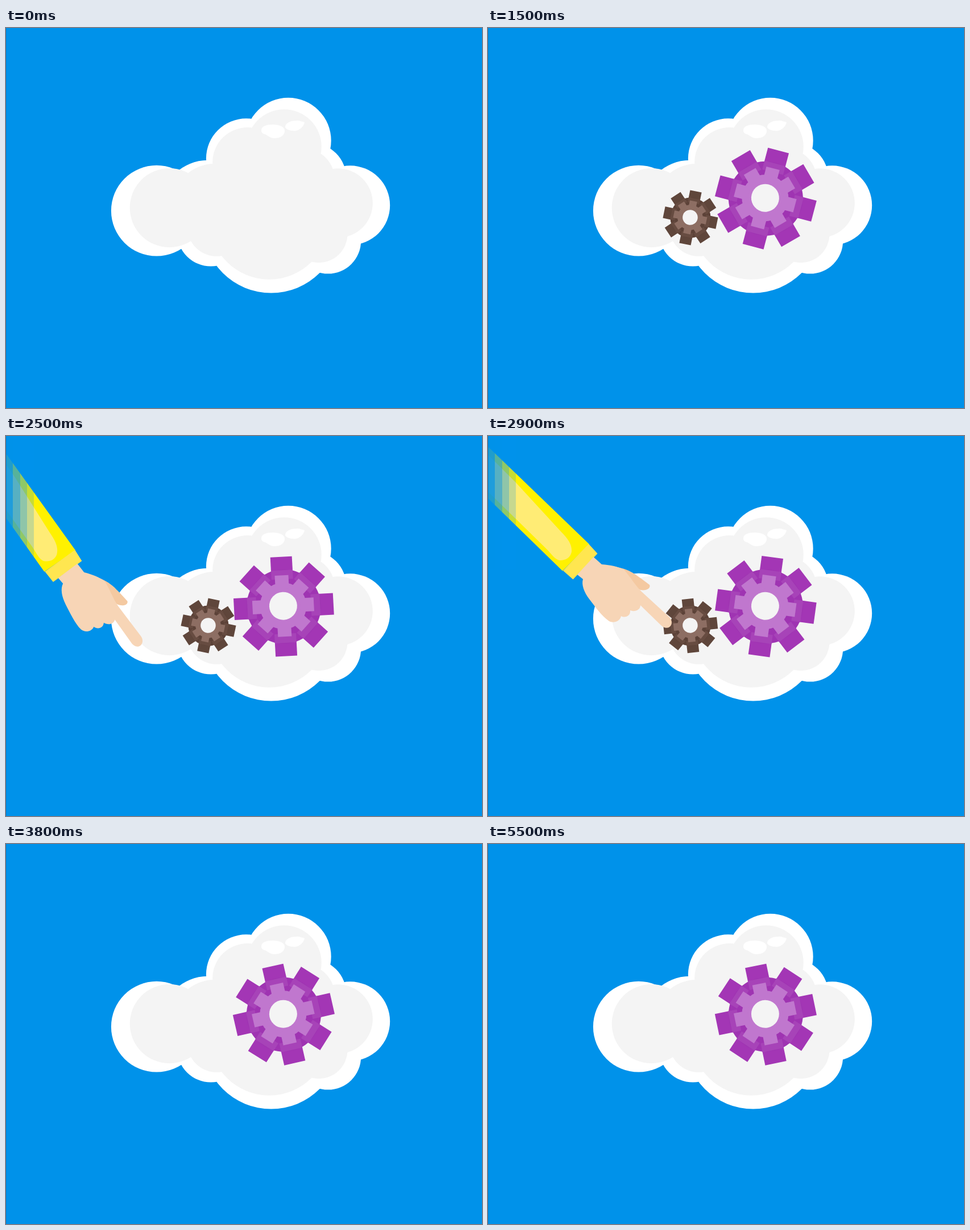
Animation, 837 px wide and 669 px high, one loop 5.6 s. Source, as an HTML page with a canvas:

```html
<!DOCTYPE html>
<html lang="en">
<head>
<meta charset="utf-8">
<title>Cloud gears</title>
<style>
  html, body { margin: 0; width: 100%; height: 100%; overflow: hidden; background: #0092ea; }
  canvas { display: block; width: 837px; height: 669px; }
</style>
</head>
<body>
<canvas id="stage" width="837" height="669"></canvas>
<script>
const ctx = document.getElementById('stage').getContext('2d');
const LOOP = 5600, STEP = 100, GRAB = 2900;
const SKY = '#0092ea', SHADE = '#f4f4f4';
const PIVOT = { x: 91, y: -112 };

const rad = deg => deg * Math.PI / 180;
const progress = (t, from, to) => Math.min(1, Math.max(0, (t - from) / (to - from)));
const easeOut = p => 1 - (1 - p) ** 2;

// Clockwise from the left: centre and radius of each puff.
const puffs = [
  [264.5, 321.5, 79.5], [354, 313, 80], [422, 229.5, 70], [496, 198, 75], [535, 265, 63],
  [605, 312, 69.5], [566, 374.5, 57.5], [466, 346, 120], [360, 360, 59]
];

function cloud(scale, dx, dy) {
  const path = new Path2D();
  for (const [x, y, r] of puffs) {
    const cx = x * scale + dx, cy = y * scale + dy, cr = r * scale + 0.4;
    path.moveTo(cx + cr, cy);
    path.arc(cx, cy, cr, 0, 2 * Math.PI);
  }
  path.rect(354 * scale + dx, 250 * scale + dy, 246 * scale, 130 * scale);
  return path;
}

const outer = cloud(1, 0.3, 0.2);
const inner = cloud(0.871, 57, 36.5);
const shine = new Path2D(
  'M449 180C449 173 458 170 468 170C481 170 491 174 490 182C489 190 482 194 472 194C463 194 460 188 455 187C451 186 449 184 449 180Z' +
  'M491 173C493 166 502 163 512 163C517 163 521 165 525 166C524 173 516 181 507 181C499 181 490 178 491 173Z');

const armParts = [
  ['#fff100', 'M178 190.500L-400 -367L-400 -280L131 237.500Z'],
  ['#ffec75', 'M-400 -366L49 82L128 168C142 182 148 192 147 204C145 214 137 219 126 219C117 217 112 208 103 199L49 146L-400 -293Z'],
  ['#ffe650', 'M177 190L192.500 207L149.500 252.500L132 237Z'],
  ['#f4c9a1', 'M222 230C248 234 258 243 268 250L284 262C287 268 278 273 268 271L246 262Z'],
  ['#f7d5b6', 'M185.500 213L200 226C216 227 228 230 239 235C251 249 259 263 270 274' +
    'L319 319C325 325 324 334 318 337C313 339 308 337 304 333L268 298' +
    'C268 307 257 310 250 307C251 317 241 321 234 317C232 327 220 330 213 326' +
    'C200 317 188 300 178 287C169 275 164 262 167 252L157 244Z']
].map(([color, d]) => [color, new Path2D(d)]);

function paint(color, path) {
  ctx.fillStyle = color;
  ctx.fill(path);
}

function disc(r, color) {
  ctx.fillStyle = color;
  ctx.beginPath();
  ctx.arc(0, 0, r, 0, 2 * Math.PI);
  ctx.fill();
}

function teeth(width, from, to, color) {
  ctx.fillStyle = color;
  for (let i = 0; i < 8; i++) {
    ctx.fillRect(-width / 2, -to, width, to - from);
    ctx.rotate(Math.PI / 4);
  }
}

function turned(x, y, angle, scale, drawPart) {
  ctx.save();
  ctx.translate(x, y);
  ctx.rotate(rad(angle));
  ctx.scale(scale, scale);
  drawPart();
  ctx.restore();
}

function gear(x, y, angle, scale, color) {
  turned(x, y, angle, scale, () => {
    teeth(38, 50, 87.5, color.tooth);
    disc(65.5, color.body);
    teeth(38, 48, 64, color.overlap);
  });
  // The hub sits slightly up and left of the rim.
  turned(x - scale, y - scale, angle, scale, () => {
    disc(41, color.core);
    teeth(24, 30, 54, color.core);
    disc(24.5, SHADE);
  });
}

function purpleGear(t) {
  const y = 300.2 - 327 * (1 - easeOut(progress(t, 300, 1500)));
  gear(488.4, y, 51.4 + 0.02715 * (t - 2850), 1,
    { tooth: '#a336b5', body: '#9f34b2', overlap: '#a743b8', core: '#c077ce' });
}

function brownGear(t) {
  const y = 334 - 150 * (1 - easeOut(progress(t, 200, 1176)));
  gear(356, y, -6.5 - 0.0448 * (t - 900), 0.542,
    { tooth: '#5f463b', body: '#5c4238', overlap: '#674c41', core: '#8d6e63' });
}

// The arm swings in, then swings back out with the small gear.
function arm(t) {
  const reach = progress(t, 2100, GRAB);
  const pull = progress(t, GRAB, 3550);
  if (reach === 0 || pull === 1) return;
  const swing = 41.5 * (1 - easeOut(reach)) + 50 * pull ** 2;
  ctx.save();
  ctx.translate(PIVOT.x, PIVOT.y + 80 * pull ** 4);
  ctx.rotate(rad(swing));
  ctx.translate(-PIVOT.x, -PIVOT.y);
  if (t >= GRAB) brownGear(GRAB);
  for (const [color, path] of armParts) paint(color, path);
  ctx.restore();

  // Stepped fade at the left border
  ctx.fillStyle = SKY;
  for (let i = 0; i < 4; i++) {
    const x = Math.round(i * 12.3);
    ctx.globalAlpha = 0.22 * (4 - i);
    ctx.fillRect(x, 0, Math.round((i + 1) * 12.3) - x, 235);
  }
  ctx.globalAlpha = 1;
}

function draw(t) {
  ctx.fillStyle = SKY;
  ctx.fillRect(0, 0, 837, 669);
  paint('#fff', outer);
  paint(SHADE, inner);
  paint('#fff', shine);

  ctx.save();
  ctx.clip(outer);
  if (t >= 300) {
    purpleGear(t);
    if (t < GRAB) brownGear(t);
  }
  ctx.restore();

  arm(t);
  ctx.fillStyle = '#0082d4';
  ctx.fillRect(0, 0, 1, 669);
}

const start = performance.now();
function tick() {
  const t = (performance.now() - start) % LOOP;
  draw(Math.floor(t / STEP) * STEP);
  requestAnimationFrame(tick);
}
tick();
</script>
</body>
</html>
```
